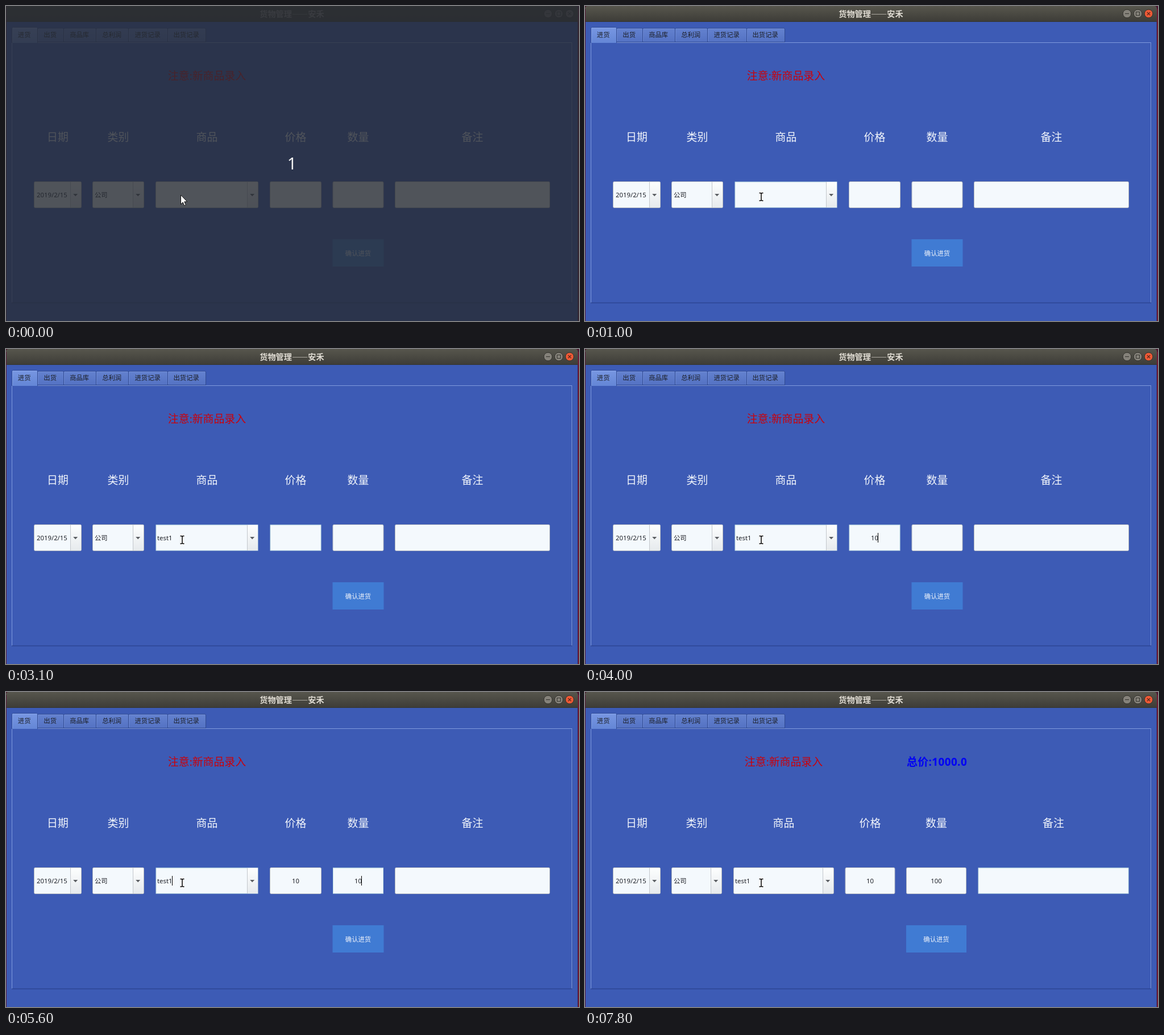
An HTML page that plays this animation: 1008 px wide and 555 px high, repeating every 8 s.

```html
<!DOCTYPE html>
<html lang="zh-CN">
<head>
<meta charset="utf-8">
<title>货物管理</title>
<style>
html, body { margin: 0; width: 100%; height: 100%; overflow: hidden; background: #3d5bb5; }
svg { display: block; width: 100%; height: 100%; }
text { font-family: "Noto Sans", "Noto Sans CJK SC", sans-serif; font-size: 11.33px; fill: #1c1f26; white-space: pre; }
.title { font-family: "Noto Sans CJK SC", "Noto Sans", sans-serif; font-size: 14.2px; font-weight: 700; }
.big { font-size: 18.9px; fill: #f1f5fb; }
.note { fill: #c9020c; }
.total { fill: #0000f5; font-weight: 700; letter-spacing: .4px; }
.light { fill: #f1f5fb; }
.count { font-size: 29px; fill: #f2f2f2; }
.mid { text-anchor: middle; }
</style>
</head>
<body>
<svg viewBox="0 0 1008 555">
  <defs>
    <linearGradient id="active" x2="0" y2="1"><stop stop-color="#57564d"/><stop offset="1" stop-color="#3d3c37"/></linearGradient>
    <linearGradient id="idle" x2="0" y2="1"><stop stop-color="#454439"/><stop offset="1" stop-color="#3c3b36"/></linearGradient>
    <linearGradient id="tabOn" x2="0" y2="1"><stop stop-color="#7897e2"/><stop offset="1" stop-color="#6486d6"/></linearGradient>
    <linearGradient id="tabOff" x2="0" y2="1"><stop stop-color="#6482cf"/><stop offset="1" stop-color="#5472c3"/></linearGradient>
    <linearGradient id="drop" x2="0" y2="1"><stop stop-color="#fdfefe"/><stop offset="1" stop-color="#e6eaed"/></linearGradient>
  </defs>
  <g id="scene"></g>
</svg>
<script>
const LOOP = 8000;
const FONT = '11.33px "Noto Sans", "Noto Sans CJK SC", sans-serif';
const FIELD_Y = 309, FIELD_H = 47;
const LABELS = ['日期', '类别', '商品', '价格', '数量', '备注'];
const TABS = [['进货', 10, 55], ['出货', 55, 101], ['商品库', 101, 158],
  ['总利润', 158, 215], ['进货记录', 215, 284], ['出货记录', 284, 351]];
// left and right edge of each column, before and after the total appears
const NARROW = [[49, 133], [152, 243], [263, 444], [464, 555], [574.5, 664.5], [684, 957]];
const WIDE = [[49, 133], [152, 241], [261, 438], [457.5, 545.5], [565, 671], [691, 957]];

const scene = document.getElementById('scene');
const ruler = document.createElement('canvas').getContext('2d');

const passed = (t, times) => times.filter(at => t >= at).length;
const blink = (t, toggles) => passed(t, toggles) % 2 === 1;
const typed = (t, word, times) => word.slice(0, passed(t, times));
const center = ([a, b]) => (a + b) / 2;

function widthOf(s) {
  ruler.font = FONT;
  return ruler.measureText(s).width;
}

function stateAt(t) {
  return {
    dim: t < 400,
    active: t >= 500,
    wide: t >= 7100,
    focus: [t >= 400 && t < 7100 && 2, t >= 2300 && t < 4400 && 3,
      t >= 4400 && t < 7100 && 4, t >= 7100 && 5],
    product: typed(t, 'test1', [1200, 1300, 1400, 1600, 2000]),
    price: typed(t, '10', [3900, 4000]),
    amount: typed(t, '100', [5400, 5500, 6700]),
    carets: [
      blink(t, [400, 1000, 1200, 2600, 3200, 3900, 4400, 5000, 5600, 6200, 6800, 7400]),
      blink(t, [2300, 3100, 3700, 4400]),
      blink(t, [4400, 5100, 5400, 6200, 6700, 7100]),
      blink(t, [7100, 7800])
    ]
  };
}

const rect = (x, y, w, h, fill, more = '') =>
  `<rect x="${x}" y="${y}" width="${w}" height="${h}" fill="${fill}" ${more}/>`;
const path = (d, stroke, more = '') => `<path d="${d}" fill="none" stroke="${stroke}" ${more}/>`;
const text = (s, x, y, cls = '') => `<text x="${x}" y="${y}" class="${cls}">${s}</text>`;
const caret = x => rect(Math.floor(x), 324, 1, 17, '#000');

function titleBar(active) {
  const button = (x, fill, icon, ink) =>
    `<circle cx="${x}" cy="13.5" r="7.3" fill="${fill}" stroke="#33322d"/>` + path(icon, ink, 'stroke-width="1.1"');
  const grey = active ? '#85827a' : '#67655e';
  const ink = active ? '#383731' : '#3b3a35';
  return rect(0, 0, 1008, 10, '#4a1730') +
    `<path d="M0 28V5Q0 0 5 0H1001Q1006 0 1006 5V28Z" fill="url(#${active ? 'active' : 'idle'})"/>` +
    rect(0, 27, 1006, 1, '#34342f') +
    text('货物管理——安禾', 503, 19, 'title mid').replace('<text', `<text style="fill:${active ? '#dfdbd2' : '#817e77'}"`) +
    button(953.5, grey, 'M950 13.5h7', ink) +
    button(972.5, grey, 'M969.5 10.5h6v6h-6z', ink) +
    button(991.5, active ? '#ee5a36' : grey, 'M988.8 10.8l5.4 5.4m0-5.4l-5.4 5.4', active ? '#45201a' : ink);
}

function tabs() {
  const tab = ([name, a, b], i) => {
    const y = i ? 39 : 37.5, bottom = i ? 63 : 65;
    const edge = `M${a + .5} ${bottom}V${y + 2}Q${a + .5} ${y} ${a + 2.5} ${y}H${b - 1.5}Q${b + .5} ${y} ${b + .5} ${y + 2}V${bottom}`;
    return `<path d="${edge}Z" fill="url(#${i ? 'tabOff' : 'tabOn'})"/>` +
      path(edge, i ? '#304a92' : '#314c98') +
      path(`M${a + 1.5} ${bottom - 1}V${y + 1.5}H${b - .5}`, i ? '#7792d9' : '#8ba7ea', 'opacity=".7"') +
      text(name, center([a, b]) - .3, 55, 'mid');
  };
  return path('M10.5 523V64.5', '#7f99dd') +
    path('M55 64.5H995.5V523', '#7f99dd') +
    path('M55 63.5H352', '#304a92') +
    path('M10 523H996', '#243b83') +
    path('M996.5 65V523', '#304a92', 'opacity=".5"') +
    TABS.map(tab).join('');
}

function field([a, b], i, focused) {
  const inset = focused ? 1 : .5;
  const box = rect(a + inset, FIELD_Y + inset, b - a - 2 * inset, FIELD_H - 2 * inset, '#f4f9fd',
    focused ? 'stroke="#c5e2e4"' : 'rx="2" stroke="#b4b9c1"');
  if (i > 2) return box;
  const split = b - 19.5, x = b - 10.8;
  return box + rect(split, FIELD_Y + 1, 18.5, FIELD_H - 2, 'url(#drop)', 'rx="1"') +
    path(`M${split} ${FIELD_Y + 1}v${FIELD_H - 2}`, '#c3c7cc') +
    `<path d="M${x - 4} 331h8l-4 4.3z" fill="#5b5e62"/>`;
}

function form(s) {
  const cols = s.wide ? WIDE : NARROW;
  const mid = cols.map(center);
  const [a, b] = cols[4];
  const left = cols[2][0] + 3;
  const caretX = [left + widthOf(s.product), mid[3] + widthOf(s.price) / 2,
    mid[4] + widthOf(s.amount) / 2, cols[5][0] + 2];
  return text('注意:新商品录入', mid[2], 130, 'big note mid') +
    (s.wide ? text('总价:1000.0', mid[4] + 1, 130, 'big total mid') : '') +
    LABELS.map((name, i) => text(name, mid[i], 238, 'big mid')).join('') +
    cols.map((c, i) => field(c, i, s.focus.includes(i))).join('') +
    text('2019/2/15', 54, 337) + text('公司', 156, 337) +
    text(s.product, left, 337) +
    text(s.price, mid[3], 337, 'mid') + text(s.amount, mid[4], 337, 'mid') +
    s.carets.map((on, i) => on ? caret(caretX[i]) : '').join('') +
    rect(a, 411, b - a, 48, '#407bd3') +
    text('确认进货', mid[4], 440, 'light mid');
}

function pointer(arrow) {
  if (arrow) return '<path d="M307.5 333v16.3l3.7-3.5 2.5 5.9 2.6-1.1-2.5-5.8h5z" fill="#fff" stroke="#111"/>';
  const beam = 'M306.5 329.5h2.3l1.2 1 1.2-1h2.3M310 330.5v11.5M306.5 343h2.3l1.2-1 1.2 1h2.3';
  return path(beam, '#fff', 'stroke-width="3.2"') + path(beam, '#000', 'stroke-width="1.5"');
}

function draw(s) {
  return rect(0, 0, 1008, 555, '#3d5bb5') + titleBar(s.active) +
    rect(0, 5, 1, 550, '#571b3c') + rect(1006, 5, 2, 550, '#6e1932') +
    path('M1005.5 28V555', '#2c4388') +
    tabs() + form(s) +
    (s.dim ? rect(0, 0, 1008, 555, '#272b32', 'opacity=".8"') + text('1', 503, 288, 'count mid') : '') +
    pointer(s.dim);
}

let shown = '';
function tick(now) {
  const s = stateAt(now % LOOP);
  const key = JSON.stringify(s);
  if (key !== shown) {
    scene.innerHTML = draw(s);
    shown = key;
  }
  requestAnimationFrame(tick);
}
tick(0);
</script>
</body>
</html>
```
